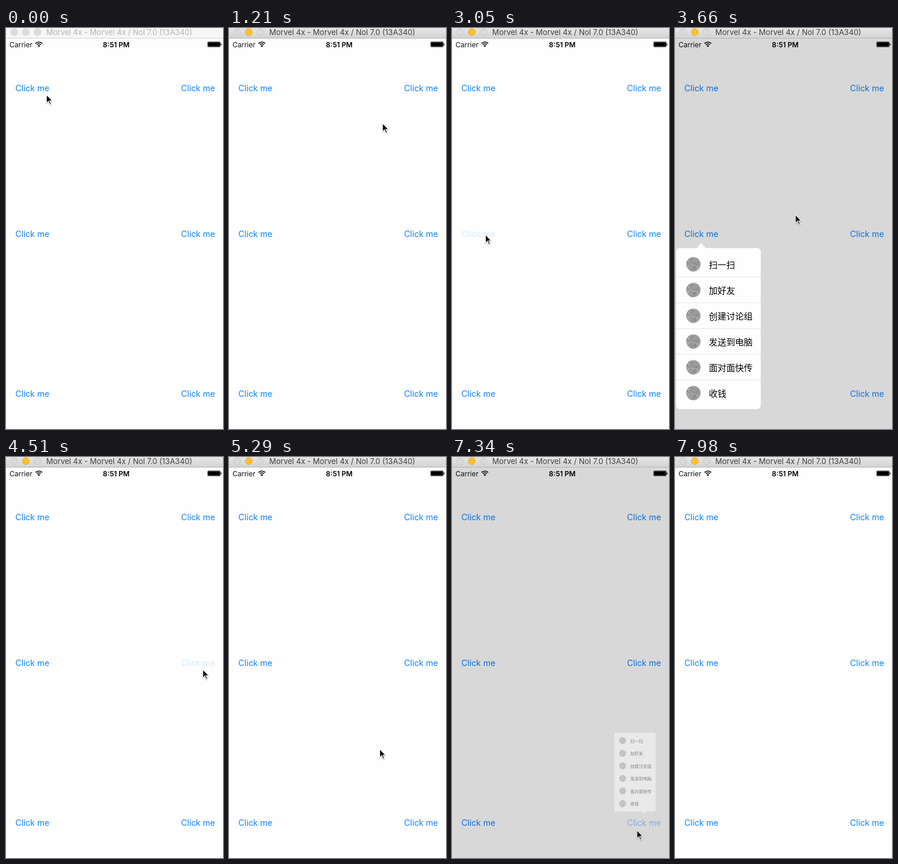
These frames come from a looping animation (372x685 px, 8480 ms). An HTML page with a canvas:

```html
<!DOCTYPE html>
<html lang="en">
<head>
<meta charset="utf-8">
<title>Popover menu demo</title>
<style>
  html, body { margin: 0; width: 100%; height: 100%; overflow: hidden; background: #fefefe; }
  canvas { display: block; width: 372px; height: 685px; }
</style>
</head>
<body>
<canvas id="stage"></canvas>
<script>
const W = 372, H = 685, LOOP = 8480, BAR = 18;
const UI = 'Inter, sans-serif';
const canvas = document.getElementById('stage');
const ctx = canvas.getContext('2d');
const ratio = window.devicePixelRatio || 1;
canvas.width = W * ratio;
canvas.height = H * ratio;

const items = ['扫一扫', '加好友', '创建讨论组', '发送到电脑', '面对面快传', '收钱'];

// Each button with the moments it is pressed and its menu is dismissed.
const buttons = [
  { x: 45, y: 103, press: 120, close: 800 },
  { x: 329, y: 103, press: 1590, close: 2220 },
  { x: 45, y: 352, press: 3010, close: 3720 },
  { x: 329, y: 352, press: 4500, close: 5000 },
  { x: 45, y: 625, press: 5950, close: 6510 },
  { x: 329, y: 625, press: 7120, close: 7630 }
];
const OPEN_DELAY = 130, MENU_TIME = 200, DIM_LINGER = 260;

// Pointer stops: time, x, y.
const pointer = [
  [0, 69, 113], [300, 69, 113], [720, 196, 212], [880, 196, 212],
  [1540, 329, 112], [1740, 329, 112], [2100, 170, 230], [2300, 170, 230],
  [2950, 57, 352], [3170, 57, 352], [3640, 206, 318], [3800, 206, 318],
  [4400, 337, 362], [4630, 337, 362], [4940, 258, 498], [5300, 258, 498],
  [5880, 58, 630], [6100, 58, 630], [6450, 271, 630], [6760, 271, 630],
  [7070, 331, 634], [7250, 331, 634], [7560, 262, 646], [7700, 262, 646],
  [7960, 250, 700]
];

const clamp = v => Math.max(0, Math.min(1, v));
const ease = v => { v = clamp(v); return v * v * (3 - 2 * v); };
const mix = (a, b, k) => a + (b - a) * k;

function text(str, x, y, font, color, align = 'left') {
  ctx.font = font;
  ctx.fillStyle = color;
  ctx.textAlign = align;
  ctx.fillText(str, x, y);
}

function disc(x, y, r, fill, edge) {
  ctx.beginPath();
  ctx.arc(x, y, r, 0, Math.PI * 2);
  ctx.fillStyle = fill;
  ctx.fill();
  if (edge) {
    ctx.strokeStyle = edge;
    ctx.lineWidth = 0.8;
    ctx.stroke();
  }
}

function roundBox(x, y, w, h, r) {
  ctx.beginPath();
  ctx.roundRect(x, y, w, h, r);
}

function polygon(points, fill) {
  ctx.beginPath();
  points.forEach(([x, y], i) => i ? ctx.lineTo(x, y) : ctx.moveTo(x, y));
  ctx.closePath();
  ctx.fillStyle = fill;
  ctx.fill();
}

function titleBar(active) {
  const shade = ctx.createLinearGradient(0, 0, 0, BAR);
  shade.addColorStop(0, active ? '#e6e6e6' : '#f6f6f6');
  shade.addColorStop(1, active ? '#d2d2d2' : '#f6f6f6');
  ctx.fillStyle = shade;
  ctx.fillRect(0, 0, W, BAR);
  ctx.fillStyle = active ? '#b4b4b4' : '#d4d4d4';
  ctx.fillRect(0, BAR - 1, W, 1);
  const idle = active ? ['#d9d9d9', '#c4c4c4'] : ['#dcdcdc', '#d0d0d0'];
  disc(14, 7, 6, ...idle);
  disc(34, 7, 6, ...(active ? ['#ffbf2f', '#e2a52c'] : idle));
  disc(54, 7, 6, ...idle);
  text('Morvel 4x - Morvel 4x / Nol 7.0 (13A340)', 69, 12, '13px ' + UI,
    active ? '#404040' : '#b4b4b4');
}

function statusBar() {
  text('Carrier', 6, 32.5, '12px ' + UI, '#111');
  text('8:51 PM', 189, 32.5, '600 12px ' + UI, '#000', 'center');
  ctx.strokeStyle = '#000';
  ctx.lineWidth = 1.7;
  for (const r of [5, 8]) {
    ctx.beginPath();
    ctx.arc(56.3, 32, r, -Math.PI * 0.75, -Math.PI * 0.25);
    ctx.stroke();
  }
  ctx.beginPath();
  ctx.moveTo(56.3, 32.6);
  ctx.arc(56.3, 32.6, 3.1, -Math.PI * 0.75, -Math.PI * 0.25);
  ctx.fillStyle = '#000';
  ctx.fill();
  roundBox(345.5, 23.5, 22, 9, 1.5);
  ctx.strokeStyle = '#555';
  ctx.lineWidth = 0.8;
  ctx.stroke();
  roundBox(346.2, 24.2, 20.6, 7.6, 0.8);
  ctx.fillStyle = '#000';
  ctx.fill();
  ctx.fillRect(368, 26.5, 1.3, 3);
}

function drawButton(b, t) {
  const since = t - b.press;
  ctx.globalAlpha = since < 0 ? 1 : mix(0.16, 1, ease((since - 130) / 250));
  text('Click me', b.x + 0.2, b.y + 5.3, '14.3px ' + UI, '#0b84ff', 'center');
  ctx.globalAlpha = 1;
}

function icon(x, y) {
  ctx.save();
  disc(x, y, 12.3, '#9c9c9c');
  ctx.clip();
  let seed = 17;
  const rnd = () => (seed = seed * 16807 % 2147483647) / 2147483647;
  ctx.lineWidth = 1;
  for (let i = 0; i < 36; i++) {
    const px = x - 13 + rnd() * 24, py = y - 12 + rnd() * 24;
    ctx.strokeStyle = i % 2 ? 'rgba(200,200,200,.55)' : 'rgba(105,105,105,.5)';
    ctx.beginPath();
    ctx.moveTo(px, py);
    ctx.quadraticCurveTo(px + 3, py - 3 * rnd(), px + 4, py + 4 - 6 * rnd());
    ctx.stroke();
  }
  ctx.restore();
}

function drawMenu(b, amount) {
  if (amount <= 0) return;
  const up = b.y > 500;
  const left = b.x < W / 2 ? -43 : -104;
  const top = up ? -284 : 9;
  const base = up ? -9.5 : 9.5;
  const scale = mix(0.1, 1, amount);
  ctx.save();
  ctx.translate(b.x, b.y + (up ? -15 : 15));
  ctx.scale(scale, scale);
  ctx.globalAlpha = amount;
  roundBox(left, top, 145, 275, 6);
  ctx.fillStyle = '#fefefe';
  ctx.fill();
  polygon([[0, 0], [-8, base], [8, base]], '#fefefe');
  items.forEach((label, i) => {
    const y = top + 28 + i * 44;
    icon(left + 29.5, y - 0.5);
    text(label, left + 56, y + 5.8, '15px "Noto Sans CJK SC", "Noto Sans CJK", sans-serif', '#000');
    if (i) {
      ctx.fillStyle = '#e8e8e8';
      ctx.fillRect(left, y - 23, 145, 1);
    }
  });
  ctx.restore();
}

function drawPointer(t) {
  const i = pointer.findIndex(p => p[0] > t);
  if (i < 1) return;
  const [t0, x0, y0] = pointer[i - 1], [t1, x1, y1] = pointer[i];
  const k = ease((t - t0) / (t1 - t0));
  ctx.save();
  ctx.translate(mix(x0, x1, k), mix(y0, y1, k));
  ctx.shadowColor = 'rgba(0,0,0,.35)';
  ctx.shadowBlur = 2 * ratio;
  ctx.shadowOffsetY = ratio;
  polygon([[0, 0], [0, 16.2], [3.7, 12.8], [6.2, 18.2], [9, 17], [6.7, 11.7], [11.5, 11.7]], '#fff');
  ctx.shadowColor = 'transparent';
  polygon([[1, 2.4], [1, 13.9], [4, 11.1], [6.7, 16.9], [7.8, 16.4], [5.2, 10.7], [9.2, 10.7]], '#000');
  ctx.restore();
}

function draw(t) {
  ctx.setTransform(ratio, 0, 0, ratio, 0, 0);
  ctx.fillStyle = '#fefefe';
  ctx.fillRect(0, 0, W, H);
  titleBar(t >= 120);
  statusBar();
  buttons.forEach(b => drawButton(b, t));
  const current = buttons.find(b => t >= b.press + OPEN_DELAY && t < b.close + DIM_LINGER);
  if (current) {
    ctx.fillStyle = 'rgba(0,0,0,.15)';
    ctx.fillRect(0, BAR, W, H - BAR);
    const opening = ease((t - current.press - OPEN_DELAY) / MENU_TIME);
    const closing = ease((t - current.close) / MENU_TIME);
    drawMenu(current, opening * (1 - closing));
  }
  drawPointer(t);
}

const start = performance.now();
function tick() {
  draw((performance.now() - start) % LOOP);
  requestAnimationFrame(tick);
}
tick();
</script>
</body>
</html>
```
